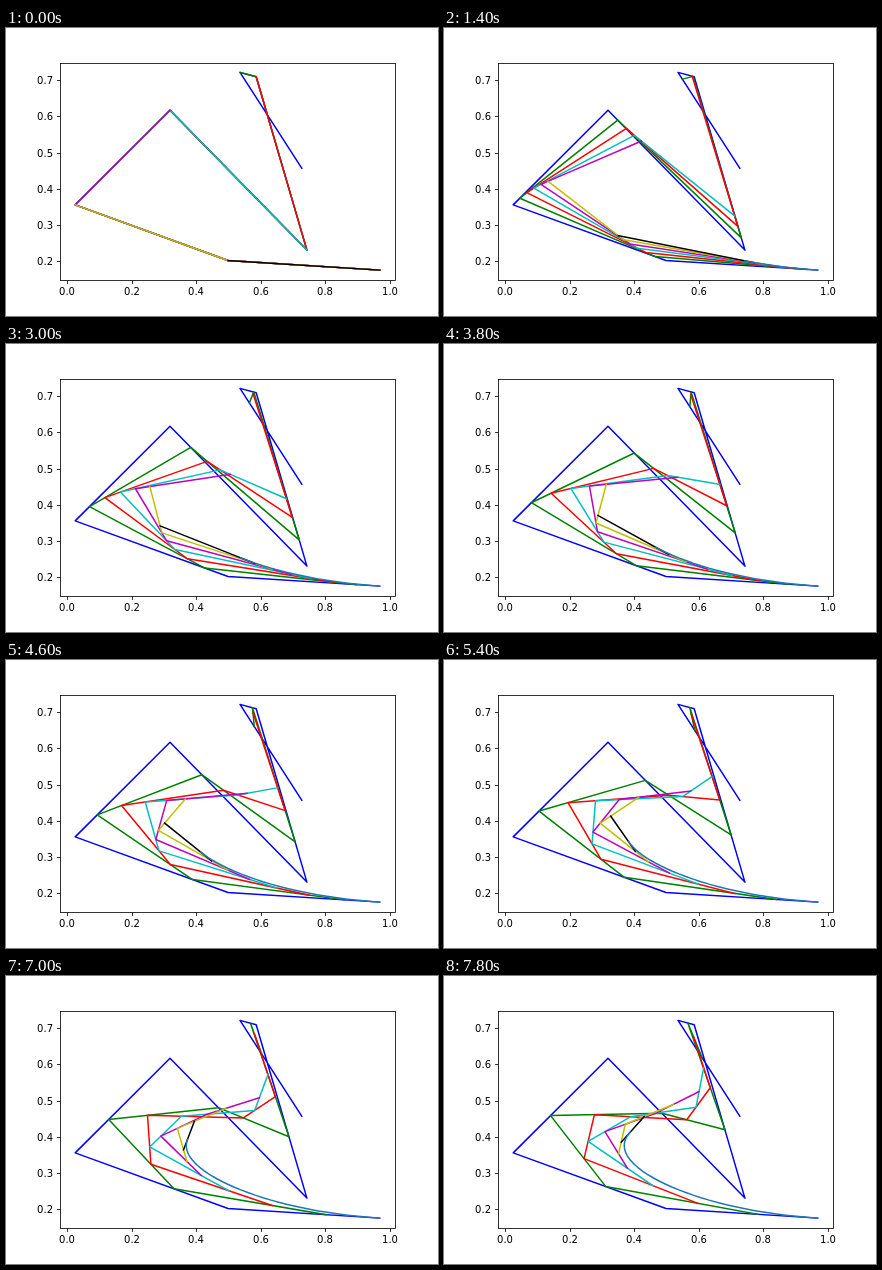
An HTML page for the animation above (8000 ms loop, 432x288 px).

```html
<!DOCTYPE html>
<html lang="en">
<head>
<meta charset="utf-8">
<title>Bézier construction</title>
<style>
  html, body { margin: 0; width: 100%; height: 100%; overflow: hidden; background: #fff; }
  svg { display: block; width: 432px; height: 288px; }
  text { font: 10px "DejaVu Sans", sans-serif; }
  .axes { fill: none; stroke: #000; stroke-width: .8; }
  .lines { fill: none; stroke-width: 1.5; stroke-linecap: square; stroke-linejoin: round; }
</style>
</head>
<body>
<svg viewBox="0 0 432 288">
  <g class="lines" id="lines"></g>
  <g class="axes" id="axes"><rect x="54.5" y="35.5" width="335" height="217"/></g>
  <g id="labels"></g>
</svg>
<script>
const STEP_MS = 200, STEPS = 40, SAMPLES = 99;
const COLORS = ['#00f', '#008000', '#f00', '#00bfbf', '#bf00bf', '#bfbf00', '#000'];
const CURVE_COLOR = '#1f77b4';
const CONTROL = [
  [373.6, 242.1], [222, 232.5], [69.2, 176.9], [164, 82.2],
  [300.9, 222.1], [250.2, 48.7], [234, 44.4], [295.8, 140.2]
];

function add(parentId, tag, attributes, text = '') {
  const node = document.createElementNS('http://www.w3.org/2000/svg', tag);
  for (const name in attributes) node.setAttribute(name, attributes[name]);
  node.textContent = text;
  document.getElementById(parentId).append(node);
  return node;
}

for (let i = 0; i < 6; i++) {
  const x = Math.round(61 + 64.55 * i), y = Math.round(233 - 36.15 * i);
  add('axes', 'path', { d: `M${x + .5} 252.5v3.5M54.5 ${y + .5}h-3.5` });
  add('labels', 'text', { x, y: 267, 'text-anchor': 'middle' }, (i / 5).toFixed(1));
  add('labels', 'text', { x: 47, y: y + 4, 'text-anchor': 'end' }, ((i + 2) / 10).toFixed(1));
}

const addLine = stroke => add('lines', 'polyline', { stroke });
const levelLines = COLORS.map(addLine);
const curveLine = addLine(CURVE_COLOR);

// One de Casteljau step: blend each pair of neighbouring points.
const blend = (points, t) => points.slice(1).map((next, i) =>
  next.map((value, axis) => points[i][axis] * (1 - t) + value * t));

function levelsAt(t) {
  const levels = [CONTROL];
  while (levels.at(-1).length > 1) levels.push(blend(levels.at(-1), t));
  return levels;
}

const curve = Array.from({ length: STEPS }, (_, i) => levelsAt(i / SAMPLES).at(-1)[0]);
const setPoints = (line, points) => line.setAttribute('points', points.join(' '));

function draw() {
  const step = Math.floor(performance.now() / STEP_MS) % STEPS;
  const levels = levelsAt(step / SAMPLES);
  levelLines.forEach((line, i) => setPoints(line, levels[i]));
  setPoints(curveLine, step ? curve.slice(0, step + 1) : []);
  requestAnimationFrame(draw);
}
draw();
</script>
</body>
</html>
```
